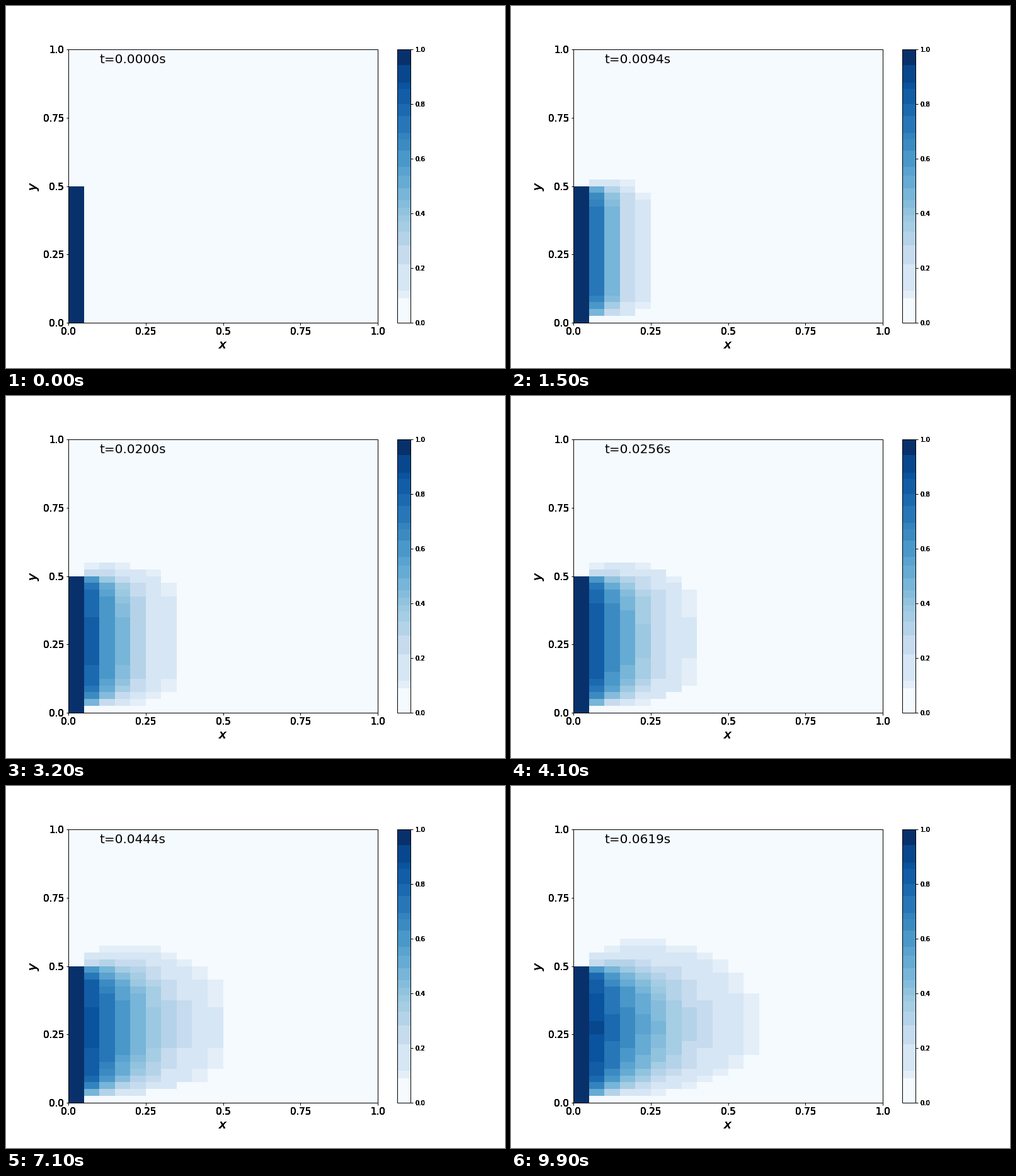
Write a matplotlib script that moves like this. It is 792 px wide and 576 px high and loops after 10000 ms.

```python
import numpy as np
import matplotlib.pyplot as plt
from matplotlib.animation import FuncAnimation
from matplotlib.colors import ListedColormap

plt.rcParams.update({
    "font.family": "DejaVu Sans",
    "axes.linewidth": 1.0,
    "xtick.major.width": 1.0,
    "ytick.major.width": 1.0,
})

FRAMES, INTERVAL = 100, 100
NX, NY = 20, 40
DX = 0.05
DT = DX * DX / 4


def banded_blues(edges, size=1000):
    """Blues, flattened to one colour between each pair of edges."""
    bounds = np.array([0, *edges, 1])
    centers = (bounds[:-1] + bounds[1:]) / 2
    colors = plt.get_cmap("Blues")(centers)
    colors[0] = (0.961, 0.98, 0.996, 1)
    colors[-1] = plt.get_cmap("Blues")(1.0)
    band = np.digitize((np.arange(size) + 0.5) / size, edges)
    return ListedColormap(colors[band])


def diffuse():
    """Explicit heat steps from a hot strip on the left wall."""
    u = np.zeros((NY + 1, NX + 1))
    u[:NY // 2, 0] = 1
    states = [u]
    for _ in range(FRAMES - 1):
        v = u.copy()
        v[1:-1, 1:-1] = (u[2:, 1:-1] + u[:-2, 1:-1]
                         + u[1:-1, 2:] + u[1:-1, :-2]) / 4
        states.append(v)
        u = v
    return states


def overdraw(text, times=8):
    """Paint a label several times so its soft edges turn solid."""
    draw = text.draw

    def repeat(renderer):
        for _ in range(times):
            draw(renderer)

    text.draw = repeat


states = diffuse()
cmap = banded_blues([0.09, 0.117, 0.214, 0.282, 0.333, 0.371, 0.393, 0.42,
                     0.448, 0.492, 0.538, 0.57, 0.63, 0.671, 0.694, 0.756,
                     0.80, 0.855, 0.878, 0.9425])

fig, ax = plt.subplots(figsize=(11, 8), dpi=72)
fig.subplots_adjust(left=0.125, right=0.9, bottom=0.125, top=0.88)

mesh = ax.pcolormesh(np.linspace(0, 1, NX + 1), np.linspace(0, 1, NY + 1),
                     states[0][:-1, :-1], cmap=cmap, vmin=0, vmax=1)
bar = fig.colorbar(mesh, ax=ax, ticks=np.linspace(0, 1, 6))
bar.ax.set_yticklabels([f"{v:.1f}" for v in np.linspace(0, 1, 6)])

ticks = [0.0, 0.25, 0.5, 0.75, 1.0]
ax.set_xticks(ticks, [str(v) for v in ticks], fontsize=15)
ax.set_yticks(ticks, [str(v) for v in ticks], fontsize=15)
ax.set_xlabel("$x$", fontsize=20)
ax.set_ylabel("$y$", fontsize=20)
clock = ax.text(0.1, 0.95, "", fontsize=20)

for label in (*ax.get_xticklabels(), *ax.get_yticklabels(),
              *bar.ax.get_yticklabels(), ax.xaxis.label, ax.yaxis.label):
    overdraw(label)


def update(n):
    mesh.set_array(states[n][:-1, :-1])
    clock.set_text(f"t={n * DT:.4f}s")
    return mesh, clock


anim = FuncAnimation(fig, update, frames=FRAMES, interval=INTERVAL,
                     repeat=True, repeat_delay=0)
plt.show()
```
